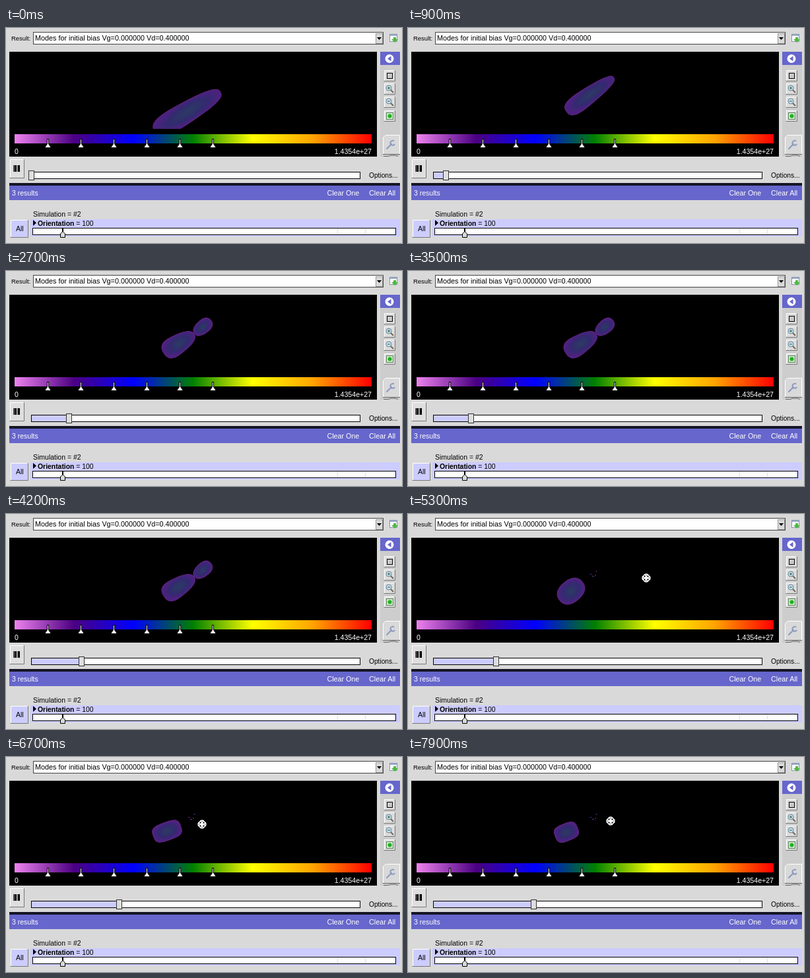
These frames come from a looping animation (600x326 px, 8000 ms). An HTML page:

```html
<!DOCTYPE html>
<html lang="en">
<head>
<meta charset="utf-8">
<title>Mode viewer</title>
<style>
  html, body { margin: 0; width: 100%; height: 100%; overflow: hidden; background: #d9d9d9; }
  svg { display: block; width: 600px; height: 326px; }
  text { font: 10.5px "Liberation Sans", Arial, sans-serif; }
  .trough { fill: #fff; stroke: #000; }
  .soft { filter: blur(.7px); }
</style>
</head>
<body>
<svg viewBox="0 0 600 326">
  <defs>
    <linearGradient id="rainbow"></linearGradient>
    <radialGradient id="lobe">
      <stop offset="0" stop-color="#2c3c62"/><stop offset=".6" stop-color="#332a70"/><stop offset="1" stop-color="#4e2180"/>
    </radialGradient>
    <clipPath id="view"><rect x="5" y="36" width="557" height="117"/></clipPath>
    <g id="lens">
      <path d="M9 9L14 14" stroke="#75664f" stroke-width="2"/>
      <circle cx="7" cy="7" r="4" fill="#c9dfee" stroke="#668399"/>
      <path d="M5 7H9" stroke="#286028"/>
    </g>
  </defs>

  <!-- result chooser -->
  <text x="8" y="19" style="font-size:9.4px">Result:</text>
  <rect x="41.5" y="6.5" width="530" height="18" fill="#fff" stroke="#444"/>
  <text x="44" y="19" style="font-size:10.8px">Modes for initial bias Vg=0.000000 Vd=0.400000</text>
  <rect x="560.5" y="8.5" width="10" height="15" fill="#d9d9d9" stroke="#999"/>
  <path d="M562 14H569L565.5 18z"/>
  <rect x="581.5" y="9.5" width="11" height="11" fill="#fff" stroke="#8a94a8"/>
  <path d="M582 11H592" stroke="#9bb0d0" stroke-width="2"/>
  <path d="M587 14H591V17H594L589 22L584 17H587z" fill="#4cb83c"/>

  <!-- volume view -->
  <rect x="5" y="36" width="557" height="159"/>
  <g clip-path="url(#view)">
    <g class="soft" fill="url(#lobe)" stroke="#622582"><path id="body"/><path id="tip"/></g>
    <path id="wisps" d="M276 91l2 1M279 94l3 1M284 92v2M285 88l1 -2" stroke="#74379c"/>
  </g>
  <rect x="13" y="161" width="541" height="14" fill="url(#rainbow)"/>
  <g id="markers"></g>
  <g fill="#fff"><text x="13" y="191">0</text><text x="554" y="191" text-anchor="end" style="font-size:10.6px">1.4354e+27</text></g>
  <g id="cursor">
    <path d="M-2 -6H2L6 -2V2L2 6H-2L-6 2V-2z" fill="#fff" stroke="#fff" stroke-linejoin="round"/>
    <path d="M-4 -2.5H4M-4 2.5H4" stroke="#000" stroke-width="2" stroke-dasharray="2 3" stroke-dashoffset="-.5"/>
    <path d="M0 -5V-4M0 4V5M-5 0H-4M4 0H5" stroke="#000"/>
  </g>

  <!-- side tools -->
  <rect x="567" y="56" width="30" height="139" fill="#cdcdcd"/>
  <rect x="567" y="36" width="30" height="20" fill="#6666cc"/>
  <circle cx="581" cy="46.5" r="6.5" fill="#fff"/>
  <path d="M583.5 42.5V50.5L578 46.5z" fill="#6666cc"/>
  <g id="buttons"></g>
  <rect x="577.5" y="68.5" width="8" height="8" fill="#c9c9c9" stroke="#000"/>
  <use href="#lens" x="573" y="84"/><use href="#lens" x="573" y="104"/>
  <path d="M580 89V93" stroke="#286028"/>
  <rect x="576.5" y="128.5" width="10" height="10" fill="#cfeacb" stroke="#5a865a"/>
  <circle cx="581.5" cy="133.5" r="3" fill="#20b020"/>
  <path d="M571.5 191V166L575 162.5H596.5V191" fill="#d9d9d9" stroke="#fff"/>
  <path d="M571 191.5H597M572 194.5H579L583 193H590L594 194.5" fill="none" stroke="#666"/>
  <g fill="none" stroke="#8c9ac0" stroke-width="2">
    <path d="M577 183L584 176" stroke-linecap="round"/><path d="M588 171.5A3.5 3.5 0 1 0 589 176"/>
  </g>

  <!-- player -->
  <path d="M12.5 208V218M15 208V218M18.5 208V218M20 208V218" stroke="#000" stroke-width="2"/>
  <rect class="trough" x="38.5" y="218.5" width="498" height="10"/>
  <rect id="played" x="39" y="219" height="9" fill="#ccccff"/>
  <rect id="handle" y="216.5" width="8" height="14" fill="#dedede" stroke="#333"/>
  <text x="550" y="227" style="font-size:10.2px">Options...</text>

  <!-- results -->
  <rect x="5" y="235" width="592" height="4" fill="#151525"/>
  <rect x="5" y="239" width="592" height="22" fill="#6666cc"/>
  <g fill="#fff"><text x="9" y="254">3 results</text><text x="486.5" y="254" style="font-size:10.7px">Clear One</text><text x="550" y="254" style="font-size:10.8px">Clear All</text></g>
  <text x="41" y="286">Simulation = #2</text>
  <rect x="37" y="290" width="560" height="26" fill="#ccccff"/>
  <text x="15" y="308">All</text>
  <path d="M41 291L46 295.5L41 300z"/>
  <text x="48" y="300" style="font-size:10.4px"><tspan font-weight="bold">Orientation</tspan> = 100</text>
  <rect class="trough" x="40.5" y="303.5" width="550" height="10"/>
  <path d="M502.5 304V313M544.5 304V313" stroke="#ddd"/>
  <path d="M86 303V309" stroke="#000" stroke-width="2"/>
  <path d="M82.5 317.5V312L86 308.5L89.5 312V317.5z" fill="#d9d9d9" stroke="#000"/>
</svg>
<script>
const LOOP = 8000;
const $ = id => document.getElementById(id);
const set = (id, attrs) => Object.entries(attrs).forEach(([name, value]) => $(id).setAttribute(name, value));
const show = (id, on) => set(id, { visibility: on ? "visible" : "hidden" });
const clamp01 = u => Math.min(1, Math.max(0, u));

$("rainbow").innerHTML = ["violet", "indigo", "blue", "green", "yellow", "orange", "red"]
  .map((color, i) => `<stop offset="${i / 6}" stop-color="${color}"/>`).join("");

for (let x = 63; x <= 313; x += 50)
  $("markers").innerHTML += `<path d="M${x + .5} 168V177" stroke="#000" stroke-width="3"/>
    <path d="M${x + .5} 169V177" stroke="#fff"/><path d="M${x + .5} 175l4 6h-8z" fill="#fff"/>`;

const bevel = (x, y, w, h, fill) => `<rect x="${x}" y="${y}" width="${w}" height="${h}" fill="${fill}"/>
  <path d="M${x + .5} ${y + h}v${.5 - h}h${w}" fill="none" stroke="#fff"/>
  <path d="M${x + w - .5} ${y}v${h - .5}h${-w}" fill="none" stroke="#777"/>`;
$("buttons").innerHTML = [64, 84, 104, 125].map(y => bevel(573, y, 17, 17, "#dcdcdc")).join("")
  + bevel(7, 291, 27, 27, "#ccccff");
document.querySelector("#played").previousElementSibling.previousElementSibling
  .insertAdjacentHTML("beforebegin", "<g id='pause'></g>");
$("pause").innerHTML = bevel(6, 199, 22, 29, "#dedede");
$("buttons").closest("svg").querySelectorAll("text").forEach(text => text.parentNode.appendChild(text));

// A rounded box in its own axes: tapered towards the right, squarer as `round` falls.
const lobe = (x, y, length, width, tilt, taper, round) => ({ x, y, length, width, tilt, taper, round });
const LONG = lobe(275, 127, 58, 15.5, -31, .2, .7);
const ROD = lobe(276, 101, 44, 12, -36, .3, .7);
const BULB = lobe(262, 110, 27, 14, -32, .25, .75);
const TIP = lobe(298, 85, 16, 10, -40, -.1, .85);
const EGG = lobe(247, 117, 22, 16.5, -40, 0, .85);
const BRICK = lobe(244, 112.5, 22, 13.5, -20, 0, .6);
const STUB = lobe(240, 114, 18, 13, -22, 0, .6);

const mix = (a, b, u) => Object.fromEntries(Object.keys(a).map(key => [key, a[key] + (b[key] - a[key]) * u]));

function drawLobe(id, s) {
  const power = v => Math.sign(v) * Math.abs(v) ** s.round;
  const points = Array.from({ length: 48 }, (_, i) => {
    const a = i * Math.PI / 24, u = power(Math.cos(a));
    return `${s.length * u} ${s.width * power(Math.sin(a)) * (1 - s.taper * u)}`;
  });
  set(id, { d: `M${points.join("L")}z`, transform: `translate(${s.x} ${s.y}) rotate(${s.tilt})` });
}

function draw(now) {
  const t = now % LOOP;
  const step = Math.floor((t + 150) / 950);
  const turn = clamp01((t - 5300) / 1400), settle = clamp01((t - 6700) / 1200);
  const turning = step >= 5;

  drawLobe("body", turning ? mix(mix(EGG, BRICK, turn), STUB, settle) : [LONG, ROD, ROD, BULB, BULB][step]);
  show("tip", step === 3 || step === 4);
  show("wisps", turning);
  show("cursor", turning);
  set("cursor", { transform: `translate(${361 - 64 * turn + 10 * settle} ${97 + 5 * turn - 5 * settle})` });
  show("markers", t < 4700 || t >= 5700);
  set("played", { width: 19 * step });
  set("handle", { x: 34.5 + 19 * step });
  requestAnimationFrame(draw);
}
drawLobe("tip", TIP);
requestAnimationFrame(draw);
</script>
</body>
</html>
```
